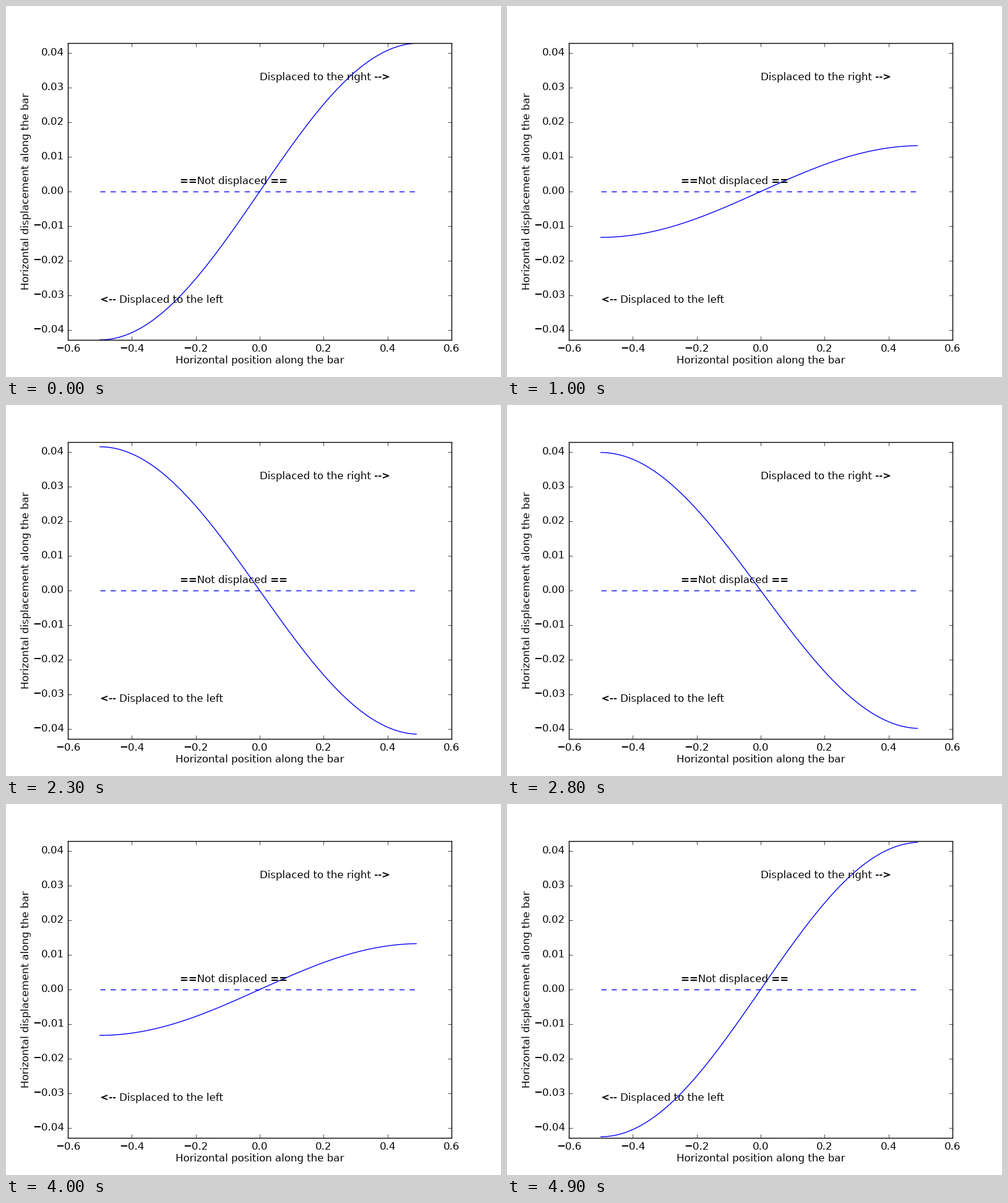
Animation, 800 px wide and 600 px high, one loop 5000 ms. Source, as a matplotlib script:

```python
import numpy as np
import matplotlib.pyplot as plt
from matplotlib.animation import FuncAnimation
from matplotlib.ticker import MultipleLocator

plt.style.use("classic")
plt.rcParams.update({
    "font.family": "DejaVu Sans",
    "font.size": 12,
    "text.hinting": "native",
    "figure.facecolor": "white",
    "savefig.facecolor": "white",
    "savefig.dpi": 100,
})

FRAMES = 50
INTERVAL = 100
AMPLITUDE = 3 / 70

position = np.arange(-50, 50) / 100
mode_shape = AMPLITUDE * np.sin(np.pi * position)

fig, ax = plt.subplots(figsize=(8, 6), dpi=100)
ax.set_xlim(-0.6, 0.6)
ax.set_ylim(-AMPLITUDE, AMPLITUDE)
ax.yaxis.set_major_locator(MultipleLocator(0.01))
ax.set_xlabel("Horizontal position along the bar", labelpad=2)
ax.set_ylabel("Horizontal displacement along the bar", labelpad=2)

ax.plot(position, np.zeros_like(position), "b--")
bar, = ax.plot(position, mode_shape, "b-")

ax.text(0, 0.75 * AMPLITUDE, "Displaced to the right -->")
ax.text(-0.25, 0.05 * AMPLITUDE, "==Not displaced ==")
ax.text(-0.5, -0.75 * AMPLITUDE, "<-- Displaced to the left")


def update(frame):
    """Standing wave: one full oscillation per loop."""
    bar.set_ydata(mode_shape * np.cos(2 * np.pi * frame / FRAMES))
    return bar,


anim = FuncAnimation(fig, update, frames=FRAMES, interval=INTERVAL,
                     repeat=True, repeat_delay=0)
plt.show()
```
